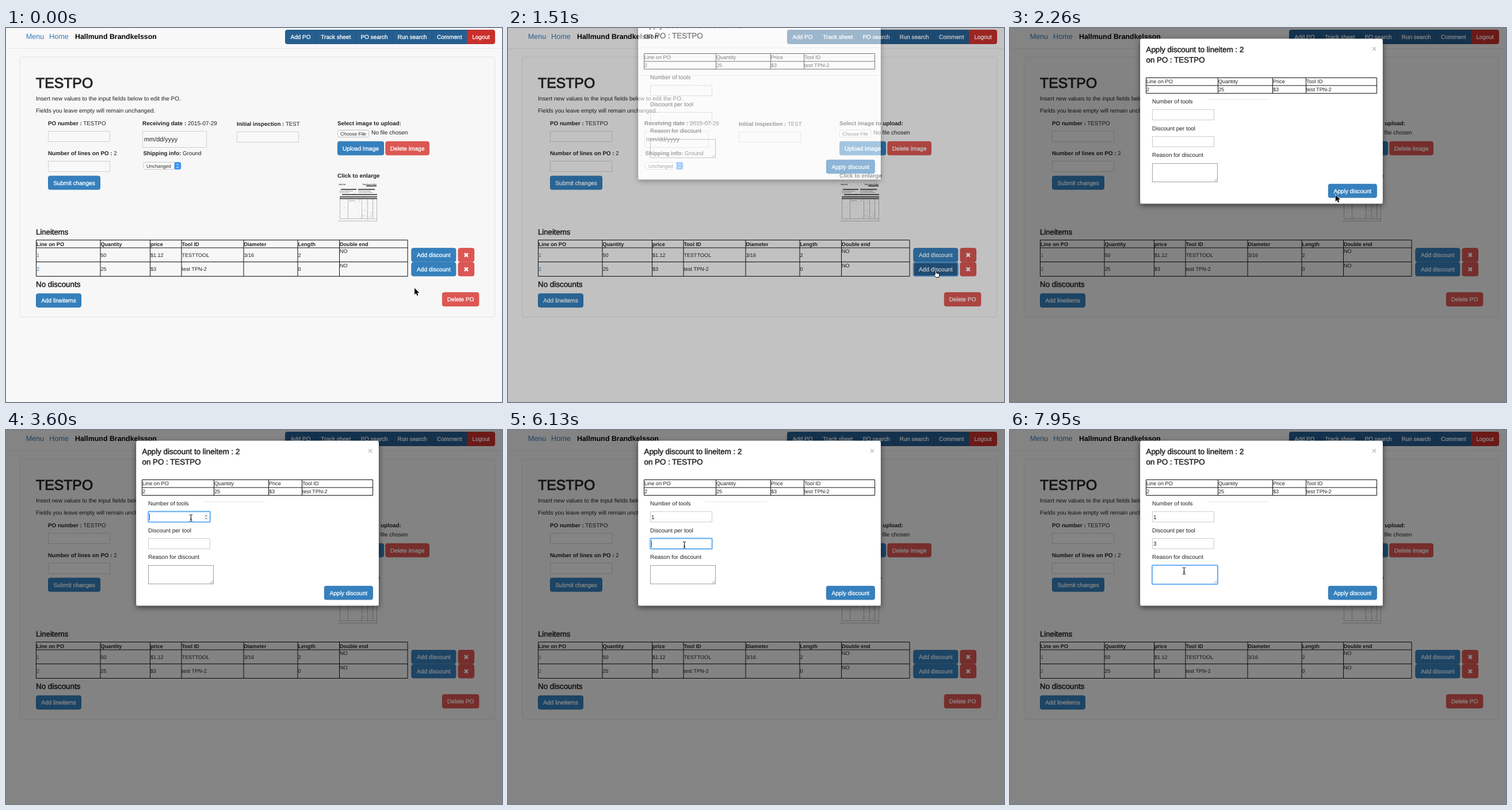
Animation, 862 px wide and 650 px high, one loop 8 s. Source, as an HTML page:

```html
<!DOCTYPE html>
<html lang="en">
<head>
<meta charset="utf-8">
<title>Edit PO</title>
<style>
html, body { margin: 0; height: 100%; overflow: hidden; background: #f8f8f8; }
svg { display: block; width: 100vw; height: 100vh; }
text { font-family: "Liberation Sans", Arial, sans-serif; text-rendering: geometricPrecision; white-space: pre; }
.b { font-weight: bold; }
.m { stroke: #2b2b2b; stroke-width: .55; }
.t { stroke: #2b2b2b; stroke-width: 1; }
.w { fill: #fff; stroke: #fff; stroke-width: .3; text-anchor: middle; }
</style>
</head>
<body>
<svg id="stage" viewBox="0 0 862 650"></svg>
<script>
const BLUE = '#3580bd', BLUE_EDGE = '#3179b4', RED = '#dc5753', RED_EDGE = '#d6504c', LINK = '#337ab7';

const text = (x, y, s, size = 10, cls = '', fill = '#222') =>
  `<text x="${x}" y="${y}" font-size="${size}" class="${cls}" fill="${fill}">${s}</text>`;
const label = (x, y, name, value, size = 9.8) =>
  text(x, y, `<tspan class="b">${name}</tspan> ${value}`, size);
const rect = (x, y, w, h, fill, stroke = 'none', rx = 0, more = '') =>
  `<rect x="${x}" y="${y}" width="${w}" height="${h}" fill="${fill}" stroke="${stroke}" rx="${rx}" ${more}/>`;
const path = (d, stroke, width = 1, fill = 'none', more = '') =>
  `<path d="${d}" fill="${fill}" stroke="${stroke}" stroke-width="${width}" ${more}/>`;
const button = (x, y, w, s, fill = BLUE, id = '') =>
  rect(x, y, w, 23.5, fill, fill === RED ? RED_EDGE : BLUE_EDGE, 3, id) +
  text(x + w / 2, y + 15.3, s, 10.1, 'w');
const input = (x, y, w = 107, h = 18, fill = '#f8f8f8', edge = '#d0d0d0') => rect(x, y, w, h, fill, edge);
const grid = (xs, ys) => {
  const [l, r, t, b] = [xs[0], xs.at(-1), ys[0], ys.at(-1)];
  return path(xs.map(x => `M${x} ${t}V${b}`).join('') + ys.map(y => `M${l} ${y}H${r}`).join(''), '#111');
};
const row = (xs, y, cells, size, cls) =>
  cells.map((s, i) => text(xs[i] + .4, y, s, size, cls)).join('');

function navBar() {
  const names = ['Add PO', 'Track sheet', 'PO search', 'Run search', 'Comment', 'Logout'];
  const edges = [485.5, 538.5, 608, 672, 740, 801.5, 849.5];
  return path('M0 35.5H862', '#e7e7e7') +
    text(34.7, 19, 'Menu', 12.7, '', LINK) + text(75, 19, 'Home', 12.7, '', LINK) +
    text(120, 19, 'Hallmund Brandkelsson', 12.4, 'b', '#000') +
    path('M801.5 3.5H488.5q-3 0-3 3v18q0 3 3 3h313z', '#24598a', 1, '#265f90') +
    path('M801.5 3.5h45q3 0 3 3v18q0 3-3 3h-45z', '#c22d2a', 1, '#c9302c') +
    path(edges.slice(1, 5).map(x => `M${x} 4V27`).join(''), '#215482') +
    names.map((s, i) => text((edges[i] + edges[i + 1]) / 2, 19, s, 10, 'w')).join('');
}

function thumbnail() {
  let seed = 7, specks = '';
  const rnd = n => (seed = seed * 16807 % 2147483647) / 2147483647 * n;
  for (let i = 0; i < 90; i++)
    specks += `M${577 + rnd(64)} ${268 + rnd(66)}l${rnd(6) - 2} ${rnd(4) - 2}`;
  return path(specks, '#c4c4c4', .6) +
    text(578, 272.5, 'TESTPO', 3, 'b') + text(620, 272.5, 'Purchase Order', 3.2, 'b') +
    path('M582 280.5h27M612 280.5h29M626 274.5h18M584 289.5h61M580 293.5h65M580 296.5h65', '#222', 1.6) +
    path('M579 283.5h24M579 286h18M612 283.5h22M612 286h26M596 300h10', '#888', .7) +
    path('M580.5 297V331M594.5 297V331M618.5 297V331M628.5 297V331M637.5 297V331M644.5 297V336M580 331.5h65M577 335.5h68', '#a0a0a0', .7);
}

function page() {
  const cols = [52.5, 164, 250.5, 305, 413, 507, 579.5, 698];
  const cross = y => rect(786, y, 27.5, 23.5, RED, RED_EDGE, 3) +
    path(`M796.8 ${y + 8.8}l6 6m0-6l-6 6`, '#fff', 2.5);
  return rect(0, 0, 862, 650, '#f8f8f8') + navBar() +
    rect(24.5, 50.5, 825, 452, '#f7f7f7', '#e3e3e3', 3) +
    text(52, 104.3, 'TESTPO', 24.8, 't') +
    text(52, 126.3, 'Insert new values to the input fields below to edit the PO.') +
    text(52, 147.3, 'Fields you leave empty will remain unchanged.') +
    label(73, 168.5, 'PO number :', 'TESTPO') + input(73.5, 179.5) +
    label(73, 221, 'Number of lines on PO :', '2') + input(73.5, 231.5) +
    button(73.5, 257.2, 90, 'Submit changes') +
    label(237, 168.5, 'Receiving date :', '2015-07-29', 9.95) + input(237.5, 179.5, 111, 28) +
    text(240, 197.2, 'mm/dd/yyyy', 10.9) +
    label(238.5, 221, 'Shipping info:', 'Ground') +
    rect(239, 233.5, 65, 12, '#fff', '#c4c4c4', 3) + rect(292.5, 233, 11.5, 13, '#3a94f4', 'none', 3) +
    path('M296 238.3l2.2-2.2 2.2 2.2M296 241l2.2 2.2 2.2-2.2', '#fff', 1) +
    text(244, 242.5, 'Unchanged', 8.4) +
    label(401, 170, 'Initial inspection :', 'TEST', 9.7) + input(401.5, 180.5) +
    text(576, 168.5, 'Select image to upload:', 9.9, 'b') +
    rect(576.5, 177.5, 54, 12, '#fff', '#bbb', 3) + text(581, 186.7, 'Choose File', 8.45) +
    text(635, 185, 'No file chosen') +
    button(576.5, 197.3, 80, 'Upload Image') + button(659.8, 197.3, 75.5, 'Delete image', RED) +
    text(576, 259.7, 'Click to enlarge', 9.9, 'b') + thumbnail() +
    text(52, 359.3, 'Lineitems', 13.2, 'm') +
    grid(cols, [368.5, 382, 406.5, 431.5]) +
    row(cols, 379, ['Line on PO', 'Quantity', 'price', 'Tool ID', 'Diameter', 'Length', 'Double end'], 9.15, 'b') +
    row(cols, 397.5, ['', '50', '$1.12', 'TESTTOOL', '3/16', '2'], 9.1) +
    row(cols, 422.3, ['', '25', '$3', 'test TPN-2', '', '0'], 9.1) +
    text(53, 397.5, '1', 9.1, '', LINK) + text(53, 422.3, '2', 9.1, '', LINK) +
    text(580, 391, 'NO', 9.1) + text(580, 416, 'NO', 9.1) +
    button(704.8, 382.7, 77, 'Add discount') + cross(382.7) +
    button(704.8, 407.5, 77, 'Add discount', BLUE, 'id="add"') + cross(407.5) +
    text(52, 450.3, 'No discounts', 13.4, 'm') +
    button(52.5, 461.8, 78, 'Add lineitems') + button(758.3, 459.8, 63.5, 'Delete PO', RED);
}

function dialog() {
  const cols = [236.5, 361.5, 456.5, 514.5, 637.5];
  return rect(226, 18.5, 422, 287, '#fff', '#0004', 4, 'style="filter:drop-shadow(0 3.6px 5px #0008)" stroke-width=".7"') +
    path('', '#e6e6e6', 1, 'none', 'id="rules"') +
    text(236.5, 42.3, 'Apply discount to lineitem : 2', 13.35, 'm') +
    text(236.5, 60, 'on PO : TESTPO', 13.35, 'm') +
    text(628.8, 41, '×', 14.5, 'b', '#c4c4c4') +
    grid(cols, [86.5, 100, 113.5]) +
    row(cols, 96.2, ['Line on PO', 'Quantity', 'Price', 'Tool ID'], 9.2) +
    row(cols, 109.7, ['2', '25', '$3', 'test TPN-2'], 9.2) +
    text(247, 131.3, 'Number of tools') + input(247.5, 141.8, 107, 18, '#fff', '#ccc') +
    text(247, 177.8, 'Discount per tool') + input(247.5, 188.5, 107, 18, '#fff', '#ccc') +
    text(247, 224.4, 'Reason for discount') + rect(247.5, 235.5, 113, 32, '#fff', '#a0a0a0') +
    path('M354.5 266.5l5-5M357.5 266.5l2-2', '#888', .8) +
    rect(247.3, 0, 0, 0, 'none', '#70b3f2', 1.5, 'id="ring" stroke-width="2.2"') +
    `<g id="spin">${rect(344.5, 145.5, 6.5, 11.5, '#fff', '#ccc', 3, 'stroke-width=".7"')}` +
    path('M346 150l1.8-2.3 1.8 2.3zM346 152.7l1.8 2.3 1.8-2.3z', 'none', 0, '#666') + '</g>' +
    `<g id="one">${text(249, 154.6, '1')}</g><g id="three">${text(249, 201.3, '3')}</g>` +
    path('', '#444', 1, 'none', 'id="caret"') +
    button(553.3, 271.3, 84, 'Apply discount');
}

const ARROW = 'M0 0V11.5L2.6 9 4.5 13.2 6.4 12.3 4.6 8.3H8.2Z';
const HAND = 'M1.5-.5q1.2 0 1.2 1.2V4l4 1q1.5.4 1.2 2L7 11.5H2L-2 7q-.4-1.6 1.2-1.2L.3 6.8V.7Q.3-.5 1.5-.5Z';
const BEAM = 'M-2.5-6Q0-6 0-4.5V4.5Q0 6-2.5 6M2.5-6Q0-6 0-4.5V4.5Q0 6 2.5 6M-1.5 2h3';

stage.innerHTML = page() + path('', 'none', 0, '#000', 'id="dim" fill-rule="evenodd"') +
  `<g id="modal">${dialog()}</g><g id="cursor">` +
  path(ARROW, '#fff', 1.4, '#000', 'id="arrow" paint-order="stroke"') +
  path(HAND, '#000', 1, '#fff', 'id="hand"') +
  `<g id="beam">${path(BEAM, '#fff', 2)}${path(BEAM, '#000', 1)}</g></g>`;

const el = id => document.getElementById(id);
const set = (id, attrs) => { for (const k in attrs) el(id).setAttribute(k, attrs[k]); };
const show = (id, on) => set(id, { visibility: on ? 'visible' : 'hidden' });

// x, y, width, height of the form fields
const fields = [[247.3, 141.6, 107.4, 18.4], [247.3, 188.3, 107.4, 18.4], [247, 235, 114, 33]];
// start, end, x, y of pointer moves
const moves = [
  [50, 50, 712, 451], [230, 340, 742, 422], [1740, 1740, 702, 408], [1920, 1920, 678, 400],
  [2090, 2500, 380, 108], [2740, 3190, 322, 152], [3420, 3420, 321.5, 153],
  [4150, 4810, 306.5, 200], [6190, 6420, 302, 206], [6600, 6990, 302.5, 245]
];
// start, end, x, y of the visible caret
const carets = [
  [3600, 4080, 249.5, 145], [4430, 4930, 255.5, 145], [5110, 5590, 249.5, 192],
  [6130, 6190, 249.5, 192], [6190, 6690, 255.5, 192], [7170, 7470, 255.5, 192], [7470, 7950, 249.5, 238]
];

function pointer(t) {
  let x = 710, y = 452;
  for (const [from, to, nx, ny] of moves) {
    if (t < from) break;
    const p = t >= to ? 1 : (t - from) / (to - from), k = p * p * (3 - 2 * p);
    x += (nx - x) * k;
    y += (ny - y) * k;
  }
  return [x, y];
}

function draw(t) {
  const [dy, alpha, dim] = t < 1510 ? [0, 0, 0] : t < 1560 ? [-42, .55, .22] : t < 1740 ? [-26, .88, .39] : [0, 1, .47];
  set('dim', { d: `M0 0H862V650H0ZM226 ${18.5 + dy}h422v287h-422z`, opacity: dim });
  set('modal', { transform: `translate(0 ${dy})`, opacity: alpha });
  set('rules', { d: t < 1740 ? 'M226 75.5H648M226 124.5H648' : 'M343 124.5H450' });

  const hover = t >= 340 && t < 1740, pressed = hover && t >= 1180;
  set('add', { fill: hover ? '#286090' : BLUE, stroke: pressed ? '#5ba3e6' : hover ? '#204d74' : BLUE_EDGE, 'stroke-width': pressed ? 2 : 1 });

  const focus = t < 3600 ? -1 : t < 5110 ? 0 : t < 7470 ? 1 : 2;
  show('ring', focus >= 0);
  if (focus >= 0) {
    const [x, y, width, height] = fields[focus];
    set('ring', { x, y, width, height });
  }
  show('one', t >= 4430);
  show('three', t >= 6190);
  const c = carets.find(([a, b]) => t >= a && t < b);
  set('caret', { d: c ? `M${c[2]} ${c[3]}v12` : '' });

  const [x, y] = pointer(t);
  const over = fields.findIndex(([l, u, w, h]) => x > l && x < l + w && y > u && y < u + h);
  show('spin', t >= 1740 && over === 0);
  show('hand', hover);
  show('beam', over >= 0);
  show('arrow', !hover && over < 0);
  set('cursor', { transform: `translate(${x} ${y})` });
}

function tick() {
  draw(performance.now() % 8000);
  requestAnimationFrame(tick);
}
tick();
</script>
</body>
</html>
```
